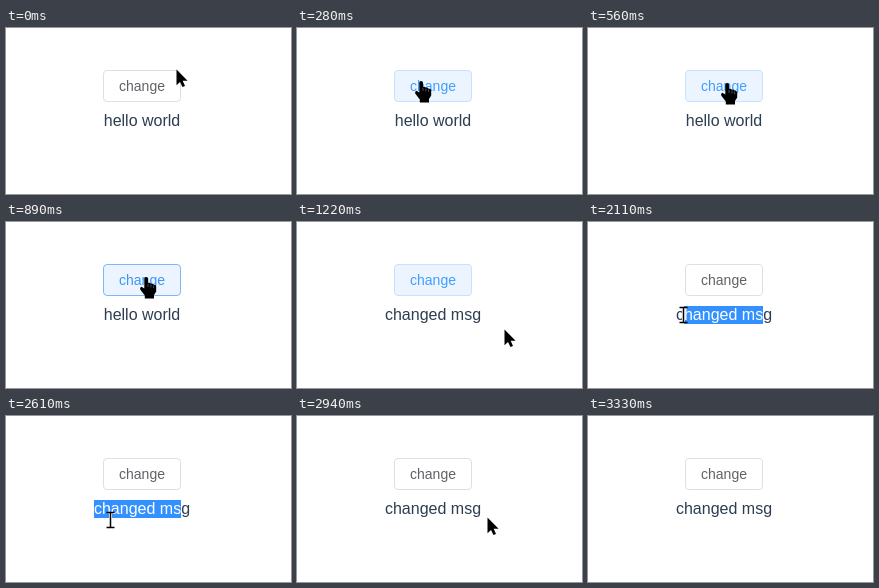
An HTML page for the animation above (4.12 s loop, 285x166 px).

```html
<!DOCTYPE html>
<html lang="en">
<head>
<meta charset="utf-8">
<title>Change message</title>
<style>
  html, body { margin: 0; width: 100%; height: 100%; overflow: hidden; background: #fff; }
  svg { display: block; }
  text { font-family: "Liberation Sans", Arial, sans-serif; text-anchor: middle; }
</style>
</head>
<body>
<svg width="285" height="166" viewBox="0 0 285 166">
  <clipPath id="selected"><rect id="clip" y="84" height="18"/></clipPath>
  <rect id="box" x="97.5" y="42.5" width="77" height="31" rx="3.5"/>
  <text id="label" x="136" y="63" font-size="14">change</text>
  <text id="message" x="136" y="98" font-size="16" fill="#2c3e50"></text>
  <g clip-path="url(#selected)">
    <rect x="80" y="84" width="120" height="18" fill="#3390ff"/>
    <text id="inverse" x="136" y="98" font-size="16" fill="#fff"></text>
  </g>
  <g id="pointer">
    <path id="arrow" d="M.5 .5V16.2L4 12.9L6.5 18L9 16.9L6.7 11.8H11.6Z"/>
    <g id="hand">
      <path d="M-1.7 1.5Q-1.7 0 0 0T2 1.5V6Q3.7 5.2 4.9 6.8Q6.5 6.1 7.6 7.8Q10 7.4 10.2 9.5V14.5L8 18V21.5H-1.2V18.5L-5.8 12.5Q-6.5 10.2 -4.5 9.8L-1.7 11.5Z"/>
      <path d="M2 7V10M4.9 7.5V10.5M7.6 8.5V11" stroke="#fff" stroke-width=".3"/>
    </g>
    <g id="beam" fill="none">
      <path d="M-.5 -7V7" stroke="#fff" stroke-width="3"/>
      <path d="M-4.5 -7.5H3.5M-.5 -7.5V7.5M-4.5 7.5H3.5" stroke="#000" stroke-width="1.5"/>
    </g>
  </g>
</svg>
<script>
const LOOP = 4120, TICK = 500 / 9;
const HOVER = 0, PRESS = 15, CLICK = 18, BLUR = 32;
const SELECT = 33, RELEASE = 40, DESELECT = 51, ANCHOR = 10;
const $ = id => document.getElementById(id);

const idle = { fill: [255, 255, 255], border: [220, 223, 230], text: [96, 98, 102] };
const hover = { fill: [236, 245, 255], border: [198, 226, 255], text: [64, 158, 255] };
const active = { ...hover, border: [58, 142, 230], text: [58, 142, 230] };

// Each move eases from wherever the previous one ended
const moves = [
  { from: 0, to: 2, x: 113, y: 52 },
  { from: 4, to: 5, x: 124, y: 53 },
  { from: 5, to: 11, x: 140, y: 55 },
  { from: 17, to: 23, x: 212, y: 111 },
  { from: 23, to: 31, x: 191, y: 98 },
  { from: 31, to: 38, x: 96, y: 93 },
  { from: 38, to: 40, x: 89, y: 104 },
  { from: 45, to: 53, x: 190, y: 101 },
  { from: 54, to: 56, x: 197, y: 106 },
  { from: 56, to: 60, x: 117, y: 180 }
];

const ramp = (t, from, to) => Math.min(1, Math.max(0, (t - from) / (to - from)));
const ease = k => k * k * (3 - 2 * k);
const mix = (a, b, k) => a + (b - a) * k;

function pointerAt(tick) {
  let x = 170, y = 41;
  for (const move of moves) {
    const k = ease(ramp(tick, move.from, move.to));
    x = mix(x, move.x, k);
    y = mix(y, move.y, k);
  }
  return [Math.round(x), Math.round(y)];
}

function pointerKind(x, y) {
  if (x >= 97 && x < 175 && y >= 42 && y < 74) return 'hand';
  if (x >= 84 && x < 186 && y >= 82 && y < 108) return 'beam';
  return 'arrow';
}

function drawButton(tick) {
  const lit = ramp(tick, HOVER, HOVER + 2) - ramp(tick, BLUR, BLUR + 2);
  const pressed = tick < CLICK ? ramp(tick, PRESS, PRESS + 2) : 0;
  const color = part => {
    const rgb = idle[part].map((v, i) =>
      Math.round(mix(mix(v, hover[part][i], lit), active[part][i], pressed)));
    return `rgb(${rgb})`;
  };
  $('box').setAttribute('fill', color('fill'));
  $('box').setAttribute('stroke', color('border'));
  $('label').setAttribute('fill', color('text'));
}

function drawSelection(tick) {
  let left = 0, width = 0;
  if (tick >= SELECT && tick < DESELECT) {
    const text = $('message');
    const origin = 136 - text.getComputedTextLength() / 2;
    const edges = Array.from({ length: ANCHOR + 1 }, (_, i) =>
      Math.round(origin + (i ? text.getSubStringLength(0, i) : 0)));
    const [x] = pointerAt(Math.min(tick, RELEASE));
    left = edges.reduce((a, b) => Math.abs(b - x) < Math.abs(a - x) ? b : a);
    width = edges[ANCHOR] - left;
  }
  $('clip').setAttribute('x', left);
  $('clip').setAttribute('width', width);
}

function drawPointer(tick) {
  const [x, y] = pointerAt(tick);
  const kind = pointerKind(x, y);
  $('pointer').setAttribute('transform', `translate(${x} ${y})`);
  for (const id of ['arrow', 'hand', 'beam']) {
    $(id).setAttribute('visibility', id === kind ? 'visible' : 'hidden');
  }
}

function render(tick) {
  const message = tick < CLICK ? 'hello world' : 'changed msg';
  $('message').textContent = $('inverse').textContent = message;
  drawButton(tick);
  drawSelection(tick);
  drawPointer(tick);
}

const start = performance.now();
function frame() {
  const time = (performance.now() - start) % LOOP;
  // Ticks fall on whole hundredths of a second
  render(Math.floor((Math.floor(time / 10) * 10 + 5) / TICK));
  requestAnimationFrame(frame);
}
frame();
</script>
</body>
</html>
```
